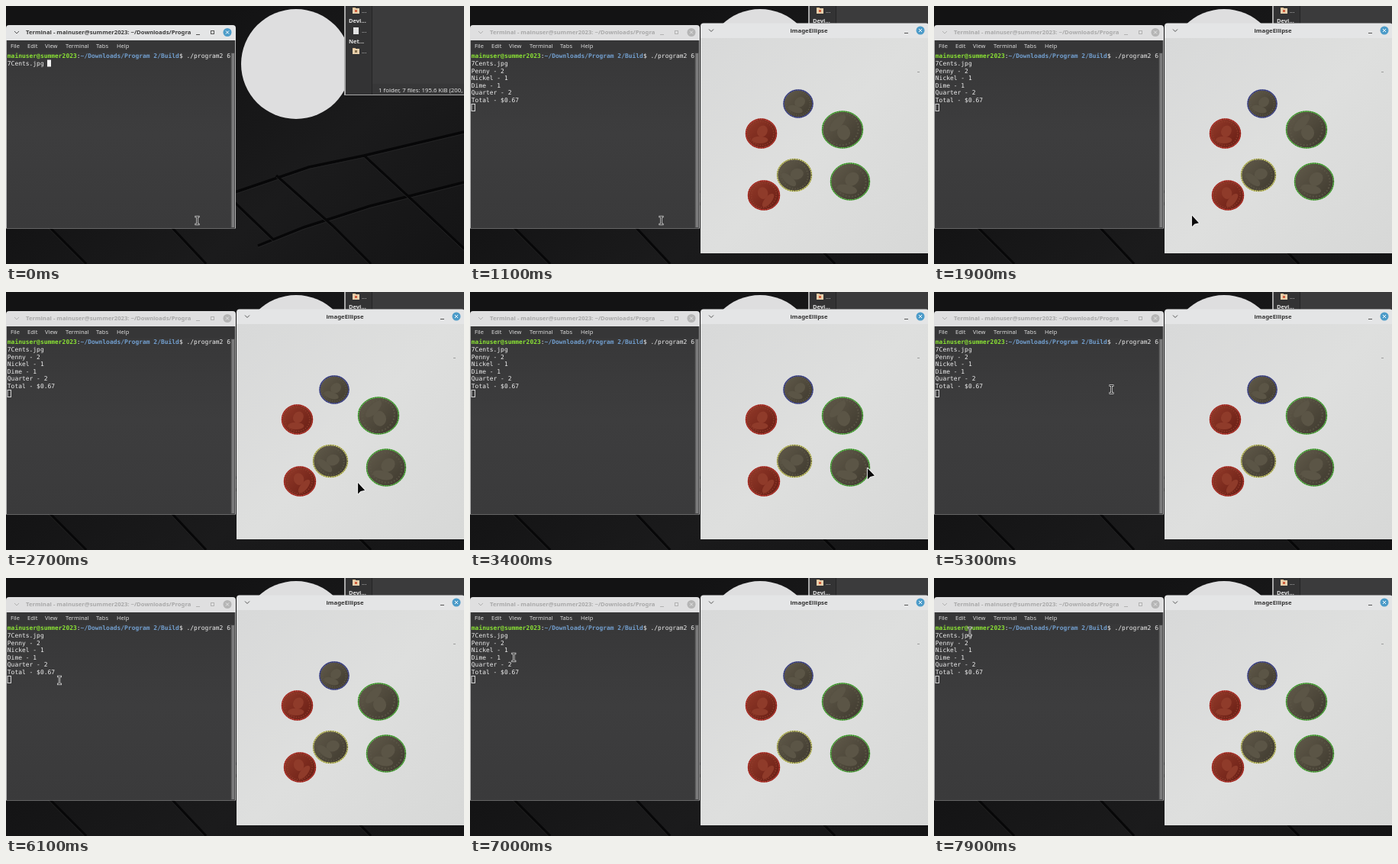
These frames come from a looping animation (600x338 px, 8 s). An HTML page with a canvas:

```html
<!DOCTYPE html>
<html lang="en">
<head>
<meta charset="utf-8">
<title>Coin counter</title>
<style>
html, body { margin: 0; width: 100%; height: 100%; overflow: hidden; background: #111; }
canvas { display: block; width: 100%; height: 100%; }
</style>
</head>
<body>
<canvas id="stage" width="600" height="338"></canvas>
<script>
const ctx = document.getElementById('stage').getContext('2d');
const LOOP = 8000, RESULT_AT = 600;
const SANS = '"Noto Sans", "Open Sans", sans-serif';
const MONO = '7.96px "DejaVu Sans Mono", monospace';
const CELL = 4.79, LINE = 9.55;
const USER = 'mainuser@summer2023';

// [time, x, y]: hotspot of the pointer
const pointerPath = [
  [0, 250.5, 281], [1500, 250.5, 281], [2300, 425, 268], [2700, 461, 250], [3050, 490, 262],
  [3300, 515, 248], [3400, 521, 231], [3800, 475, 190], [4500, 310, 131], [5100, 285, 126],
  [5900, 76, 132], [6100, 70, 134], [6800, 60, 112], [7400, 52, 88], [7900, 47, 70], [8000, 47, 70]
];

function rect(x, y, w, h, fill) {
  ctx.fillStyle = fill;
  ctx.fillRect(x, y, w, h);
}

function text(str, x, y, fill, font, align = 'left') {
  ctx.font = font;
  ctx.fillStyle = fill;
  ctx.textAlign = align;
  ctx.fillText(str, x, y);
}

function ellipse(x, y, rx, ry, fill, angle = 0) {
  ctx.beginPath();
  ctx.ellipse(x, y, rx, ry, angle, 0, Math.PI * 2);
  ctx.fillStyle = fill;
  ctx.fill();
}

function ring(rx, ry, stroke, width, dash = []) {
  ctx.setLineDash(dash);
  ctx.beginPath();
  ctx.ellipse(0, 0, rx, ry, 0, 0, Math.PI * 2);
  ctx.strokeStyle = stroke;
  ctx.lineWidth = width;
  ctx.stroke();
  ctx.setLineDash([]);
}

function line(points, stroke, width = 1) {
  ctx.beginPath();
  points.forEach(([x, y]) => ctx.lineTo(x, y));
  ctx.strokeStyle = stroke;
  ctx.lineWidth = width;
  ctx.stroke();
}

function gradient(x0, y0, x1, y1, ...colours) {
  const g = ctx.createLinearGradient(x0, y0, x1, y1);
  colours.forEach((c, i) => g.addColorStop(i / (colours.length - 1), c));
  return g;
}

function ridge(points) {
  line(points, '#070708', 3.5);
  line(points.map(([x, y]) => [x, y + 2.5]), '#222223', 1);
}

function drawWallpaper() {
  rect(0, 0, 600, 338, gradient(300, 0, 600, 338, '#131314', '#1b1b1c', '#141415'));
  ridge([[300, 244], [397, 211], [469, 196], [600, 165]]);
  ridge([[330, 314], [390, 290], [477, 262], [600, 231]]);
  ridge([[469, 196], [535, 257], [600, 318]]);
  ridge([[354, 222], [429, 289], [478, 338]]);
  ridge([[300, 258], [350, 306]]);
  ridge([[55, 288], [105, 338]]);
  ridge([[215, 288], [262, 338]]);
  ellipse(380, 76, 72, 72, '#dededf');
}

function drawFolderIcon(x, y, dot) {
  rect(x - 4, y - 4, 4, 2, '#d9b88a');
  rect(x - 4, y - 3, 9, 7, '#e8d0ac');
  rect(x - 1, y - 1, 3, 3, dot);
}

function drawFileManager() {
  rect(443, 0, 157, 117, '#a9a9a9');
  rect(445, 0, 155, 116, '#3b3b3c');
  rect(445, 0, 34, 116, '#333334');
  rect(479, 0, 1, 116, '#252526');
  rect(480, 102, 120, 14, '#373738');
  drawFolderIcon(458, 6, '#d35f3d');
  rect(455, 28, 7, 9, '#e3e3e3');
  drawFolderIcon(458, 59, '#8a7350');
  [9, 35, 62].forEach(y => text('...', 466, y, '#ddd', `7.8px ${SANS}`));
  text('Devi...', 449, 22, '#e4e4e4', `bold 7.5px ${SANS}`);
  text('Net...', 449, 49, '#e4e4e4', `bold 7.5px ${SANS}`);
  text('1 folder, 7 files: 195.6 KiB (200,', 488, 112.5, '#dedede', `7.8px ${SANS}`);
}

function drawTitleBar(x, y, w, active) {
  ctx.beginPath();
  ctx.roundRect(x, y, w, 20, [4, 4, 0, 0]);
  ctx.fillStyle = active ? '#e4e5e6' : '#dfdfe0';
  ctx.fill();
  const ink = active ? '#555' : '#b2b2b2', right = x + w;
  line([[x + 11, y + 8], [x + 14, y + 11], [x + 17, y + 8]], ink);
  ellipse(right - 11, y + 9.5, 5.5, 5.5, active ? '#4d9cc9' : '#b5b5b5');
  const cross = active ? '#fff' : '#e4e4e4';
  line([[right - 13, y + 7.5], [right - 9, y + 11.5]], cross);
  line([[right - 9, y + 7.5], [right - 13, y + 11.5]], cross);
  return ink;
}

function drawTerminal(done) {
  rect(0, 29, 301, 262.5, '#b4b4b4');
  const ink = drawTitleBar(0, 25, 301, !done);
  line([[249, 37.5], [254, 37.5]], ink);
  ctx.strokeRect(268.5, 32.5, 4, 4);
  text(`Terminal - ${USER}: ~/Downloads/Progra`, 26, 37.3,
    done ? '#a9a9a9' : '#3c3c3c', `600 7.7px ${SANS}`);

  rect(1, 45, 299, 246, gradient(0, 45, 0, 291, '#373738', '#3d3d3e', '#3a3a3b'));
  rect(1, 45, 299, 15, '#363637');
  [['File', 6], ['Edit', 28], ['View', 51], ['Terminal', 78], ['Tabs', 118], ['Help', 145]]
    .forEach(([label, x]) => text(label, x, 55.3, '#dcdcdc', `7.5px ${SANS}`));
  rect(294, 61, 6, 230, '#424243');
  rect(295.5, 62, 3.5, 228, '#7c7c7d');

  const baseline = row => 68.4 + row * LINE;
  const column = n => 1.8 + n * CELL;
  text(USER, column(0), baseline(0), '#8ae234', `bold ${MONO}`);
  text(':', column(19), baseline(0), '#eee', MONO);
  text('~/Downloads/Program 2/Build', column(20), baseline(0), '#729fcf', `bold ${MONO}`);
  text('$ ./program2 6', column(47), baseline(0), '#eee', MONO);
  text('7Cents.jpg', column(0), baseline(1), '#eee', MONO);
  if (!done) return rect(54, 70.5, 5, 9, '#f4f4f4');
  ['Penny - 2', 'Nickel - 1', 'Dime - 1', 'Quarter - 2', 'Total - $0.67']
    .forEach((row, i) => text(row, column(0), baseline(i + 2), '#eee', MONO));
  ctx.strokeStyle = '#d4d4d4';
  ctx.lineWidth = 1;
  ctx.strokeRect(2, 128.5, 4.5, 9);
}

function drawCoin(x, y, rx, ry, [light, dark, relief], rim, turn) {
  ctx.save();
  ctx.translate(x, y);
  ellipse(0, 0, rx, ry, '#c9cabf');
  ellipse(0, 0, rx - 1, ry - 1, gradient(-rx, -ry, rx, ry, light, dark));
  ctx.save();
  ctx.rotate(turn);
  ctx.scale(rx / 25, ry / 25);
  ellipse(1, -4, 8, 10, relief, 0.3);
  ellipse(0, 11, 13, 6, relief, -0.2);
  ring(20, 20, relief, 2, [1.5, 2.5]);
  ctx.restore();
  ring(rx - 0.5, ry - 0.5, rim, 1.5);
  ring(rx - 0.5, ry - 0.5, dark, 1, [1, 2]);
  ctx.restore();
}

function drawImageWindow() {
  const ink = drawTitleBar(302, 22.5, 299, true);
  line([[569, 35.5], [574, 35.5]], ink);
  text('imageEllipse', 444, 35, '#333', `600 7.8px ${SANS}`, 'center');
  rect(302, 42, 298, 282, gradient(302, 42, 600, 324, '#d8d9d9', '#dedfde', '#d7d8d7'));
  rect(586, 86, 3, 1, '#9c9c9c');

  const silver = ['#625b4b', '#3d382d', '#5b5546'];
  const copper = ['#943b2a', '#661c13', '#8f3b2a'];
  drawCoin(430, 128, 19.5, 18.5, silver, '#3a4295', 0.5);
  drawCoin(381.5, 167, 20.5, 19.5, copper, '#b22a22', 0.2);
  drawCoin(488, 162, 27, 24.5, silver, '#4bb43a', 2.5);
  drawCoin(425, 221.5, 23, 21.5, silver, '#c6c766', 0.9);
  drawCoin(498, 230, 26, 24.5, silver, '#4bb43a', 0.4);
  drawCoin(385, 248, 21, 19.5, copper, '#b22a22', -0.7);
}

function pointerAt(t) {
  const i = pointerPath.findIndex(p => p[0] > t);
  const [t0, x0, y0] = pointerPath[i - 1], [t1, x1, y1] = pointerPath[i];
  const k = (t - t0) / (t1 - t0);
  return [x0 + (x1 - x0) * k, y0 + (y1 - y0) * k];
}

function drawPointer(t) {
  const [x, y] = pointerAt(t);
  ctx.save();
  ctx.translate(x, y);
  if (x < 301) {
    for (const [colour, width, reach] of [['#e8e8e8', 2.4, 3], ['#151515', 0.9, 2.4]]) {
      line([[0, -5], [0, 5]], colour, width);
      line([[-reach, -5], [reach, -5]], colour, width);
      line([[-reach, 5], [reach, 5]], colour, width);
    }
  } else {
    const arrow = new Path2D('M0 0V14.5L3.5 11L9 9.7Z');
    ctx.lineJoin = 'round';
    ctx.lineWidth = 2;
    ctx.strokeStyle = '#efefef';
    ctx.stroke(arrow);
    ctx.fillStyle = '#0a0a0a';
    ctx.fill(arrow);
  }
  ctx.restore();
}

function frame() {
  const t = performance.now() % LOOP, done = t >= RESULT_AT;
  drawWallpaper();
  drawFileManager();
  drawTerminal(done);
  if (done) drawImageWindow();
  drawPointer(t);
  requestAnimationFrame(frame);
}
frame();
</script>
</body>
</html>
```
